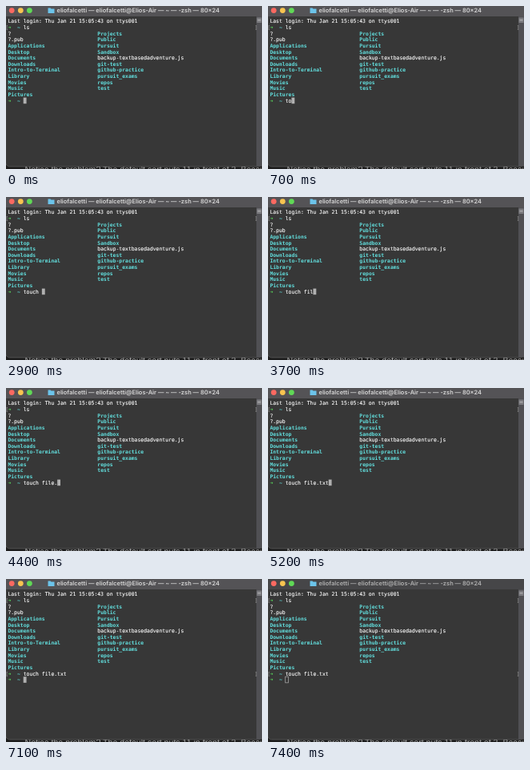
Write an HTML page that moves like this. It is 320x204 px and loops after 7700 ms.

```html
<!DOCTYPE html>
<html lang="en">
<head>
<meta charset="utf-8">
<title>Terminal: touch</title>
<style>
html, body { margin: 0; height: 100%; overflow: hidden; background: #1c1c1c; }
svg { display: block; width: 100vw; height: 100vh; }
text { white-space: pre; text-rendering: geometricPrecision; }
#screen text { font: 6.41px "DejaVu Sans Mono", monospace; fill: #fff; stroke: #fff; stroke-width: .12; }
#screen .dir { font-weight: bold; fill: #62dedd; stroke: none; }
#screen .arrow { font-weight: bold; fill: #58d65c; stroke: none; }
#screen .mark { fill: #a0a0a0; stroke: none; }
#bar { fill: #545356; }
#title { font: 600 7.45px Inter, sans-serif; fill: #d6d6d6; }
#page { font: 10.6px "Liberation Sans", Arial, sans-serif; fill: #a8a8a8; }
#cursor { fill: #b0b0b0; }
.inactive #bar { fill: #464648; }
.inactive #title { fill: #b0b0b0; }
.inactive #cursor { fill: none; stroke: #b0b0b0; stroke-width: .7; }
</style>
</head>
<body>
<svg id="stage" viewBox="0 0 320 204" preserveAspectRatio="none">
  <text id="page" x="23.5" y="208.3">Notice the problem? The default sort puts 11 in front of 2. Because</text>
  <rect x="-.3" y="-8" width="320.6" height="209" rx="5" fill="#373737" stroke="#666" stroke-width=".6"/>
  <path d="M313 13H320V200.700H313Z" fill="#505054"/>
  <path d="M313.500 14.500H319.500V21H313.500Z" fill="#7c7c80"/>
  <path d="M314.500 17.700H318.500" stroke="#c8c8c8" stroke-width=".8"/>
  <path id="bar" d="M0 0H320V13H0Z"/>
  <circle cx="7.200" cy="5.600" r="3.400" fill="#fb6961"/>
  <circle cx="18.300" cy="5.600" r="3.400" fill="#f8c450"/>
  <circle cx="29.400" cy="5.600" r="3.400" fill="#60d956"/>
  <path d="M52.500 2.500H55.500L56.500 3.500H60.500V9H52.500Z" fill="#6cc4ea"/>
  <text id="title" x="63.500" y="8.200">eliofalcetti — eliofalcetti@Elios-Air — ~ — -zsh — 80×24</text>
  <g id="screen"><rect id="cursor" width="3.860" height="7.630"/></g>
</svg>
<script>
const LOOP = 7700, CELL = 3.86, LINE = 7.63, LEFT = 2.4, TOP = 15.4;
const COMMAND = "touch file.txt";
const KEYS = [300, 500, 1100, 1200, 1300, 2900, 3500, 3600, 3700, 3800, 4300, 4600, 4800, 5000];
const ENTER = 5400, NEW_PROMPT = 5500, BLUR = 7200;

const stage = document.getElementById("stage");
const screen = document.getElementById("screen");
const cursor = document.getElementById("cursor");
const colX = col => LEFT + col * CELL;
const rowY = row => TOP + row * LINE;

function put(row, col, string, style = "") {
  const node = document.createElementNS(stage.namespaceURI, "text");
  node.setAttribute("x", colX(col));
  node.setAttribute("y", rowY(row) + 6);
  node.setAttribute("class", style);
  node.textContent = string;
  screen.append(node);
  return node;
}

const prompt = row => [put(row, 0, "➜", "arrow"), put(row, 3, "~", "dir")];
const marks = row => [put(row, -0.85, "[", "mark"), put(row, 79.9, "]", "mark")];

function show(nodes, visible) {
  for (const node of nodes) node.style.display = visible ? "" : "none";
}

put(0, 0, "Last login: Thu Jan 21 15:05:43 on ttys001");
marks(1);
prompt(1);
put(1, 5, "ls");

const listing = [
  ["?", "?.pub", "Applications", "Desktop", "Documents", "Downloads",
    "Intro-to-Terminal", "Library", "Movies", "Music", "Pictures"],
  ["Projects", "Public", "Pursuit", "Sandbox", "backup-textbasedadventure.js",
    "git-test", "github-practice", "pursuit_exams", "repos", "test"]
];
listing.forEach((names, column) => names.forEach((name, i) =>
  put(2 + i, column * 29, name, /^\?|\.js$/.test(name) ? "" : "dir")));

prompt(13);
const typed = put(13, 5, "");
const enterMarks = marks(13);
const newPrompt = prompt(14);

function draw(now) {
  const t = now % LOOP;
  const count = KEYS.filter(key => key <= t).length;
  const entered = t >= ENTER, ready = t >= NEW_PROMPT;
  typed.textContent = COMMAND.slice(0, count);
  show(enterMarks, entered);
  show(newPrompt, ready);
  const col = entered ? (ready ? 5 : 0) : 5 + count;
  cursor.setAttribute("x", colX(col));
  cursor.setAttribute("y", rowY(entered ? 14 : 13));
  stage.classList.toggle("inactive", t >= BLUR);
}

const start = performance.now();
function tick() {
  draw(performance.now() - start);
  requestAnimationFrame(tick);
}
tick();
</script>
</body>
</html>
```
